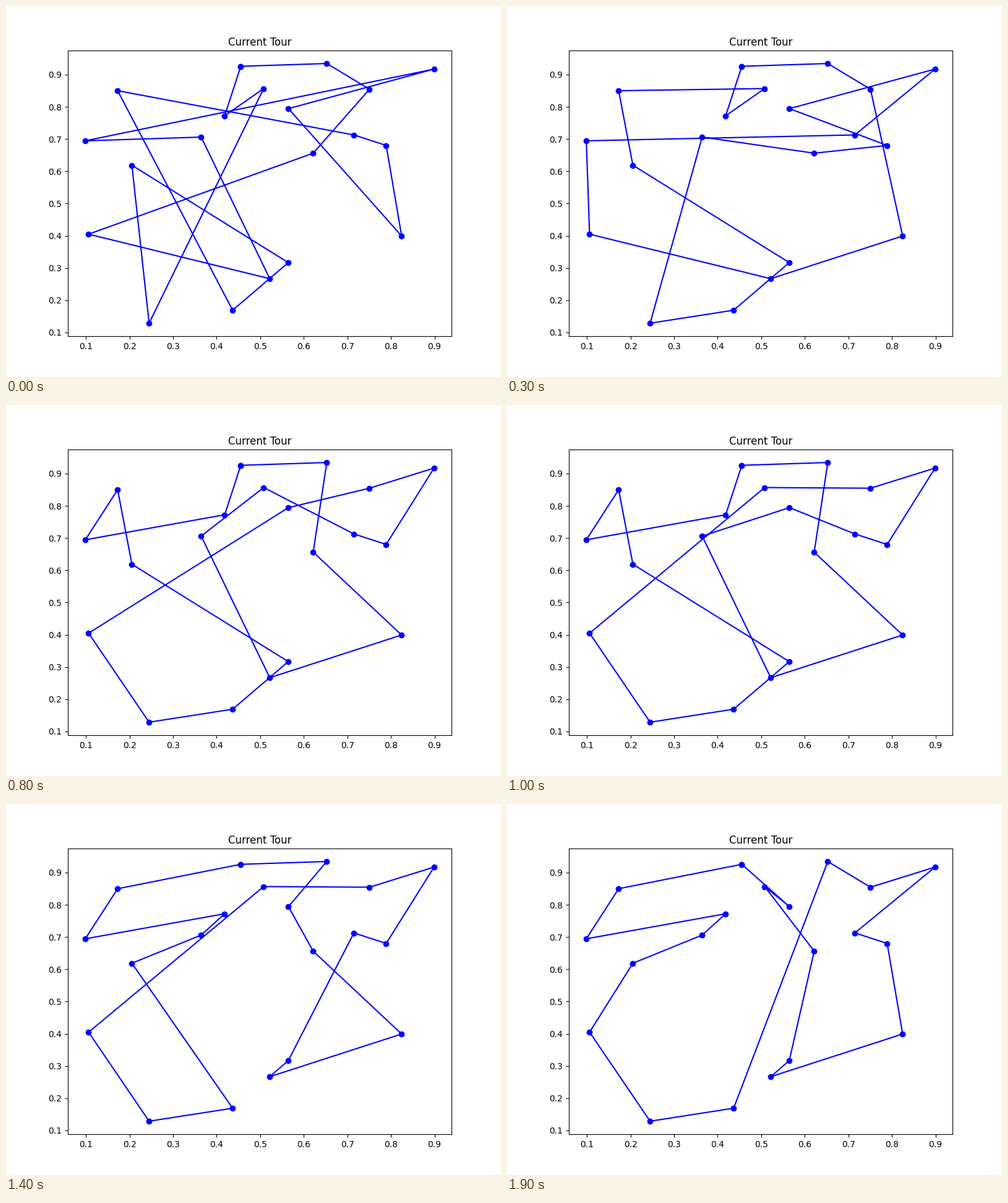
Animation of 800x600 px, one loop 2000 ms. Source, as a matplotlib script:

```python
import matplotlib.pyplot as plt
from matplotlib.animation import FuncAnimation

CITIES = {
    "A": (0.1728, 0.8499), "B": (0.4554, 0.9256), "C": (0.6528, 0.9343),
    "D": (0.7508, 0.8545), "E": (0.8990, 0.9170), "F": (0.5080, 0.8566),
    "G": (0.4185, 0.7722), "H": (0.5648, 0.7943), "I": (0.0986, 0.6945),
    "J": (0.3645, 0.7060), "K": (0.2055, 0.6187), "L": (0.7150, 0.7127),
    "M": (0.7891, 0.6801), "N": (0.6216, 0.6561), "O": (0.1061, 0.4048),
    "P": (0.8246, 0.3991), "Q": (0.5644, 0.3166), "R": (0.5219, 0.2667),
    "S": (0.4367, 0.1689), "T": (0.2450, 0.1286),
}
START = "BCDNORJIEHPMLASQKTFG"


def swap(tour, a, b):
    """Exchange two cities."""
    return tour.translate(str.maketrans(a + b, b + a))


def move(tour, city, before):
    """Take a city out and put it back in front of another."""
    return tour.replace(city, "").replace(before, city + before)


def flip(tour, a, b):
    """Reverse the stretch from a to b."""
    i, j = tour.index(a), tour.index(b) + 1
    return tour[:i] + tour[i:j][::-1] + tour[j:]


# One entry per time step
STEPS = [
    [(swap, "A", "T"), (flip, "O", "R")],
    [(swap, "N", "P"), (swap, "N", "M")],
    [(swap, "J", "I"), (swap, "J", "L")],
    [(move, "M", "E")],
    [(swap, "I", "F")],
    [(move, "N", "P")],
    [(move, "D", "H")],
    [(swap, "O", "J")],
    [(move, "H", "L")],
    [(move, "F", "O")],
    [(swap, "J", "Q")],
    [(swap, "J", "K")],
    [(flip, "A", "G")],
    [(move, "H", "N")],
    [(flip, "P", "Q")],
    [(flip, "L", "M")],
    [(flip, "O", "S")],
    [(move, "F", "N")],
    [(move, "C", "S")],
]

tours = [START]
for step in STEPS:
    tour = tours[-1]
    for change, a, b in step:
        tour = change(tour, a, b)
    tours.append(tour)


def route(tour):
    """Coordinates of the closed tour."""
    return zip(*(CITIES[c] for c in tour + tour[0]))


fig, ax = plt.subplots(figsize=(8, 6), dpi=100)
line, = ax.plot(*route(START), "bo-")
ax.set_title("Current Tour")


def draw(i):
    line.set_data(*map(list, route(tours[i])))
    return line,


anim = FuncAnimation(fig, draw, frames=len(tours), interval=100,
                     repeat=True, repeat_delay=0)
plt.show()
```
